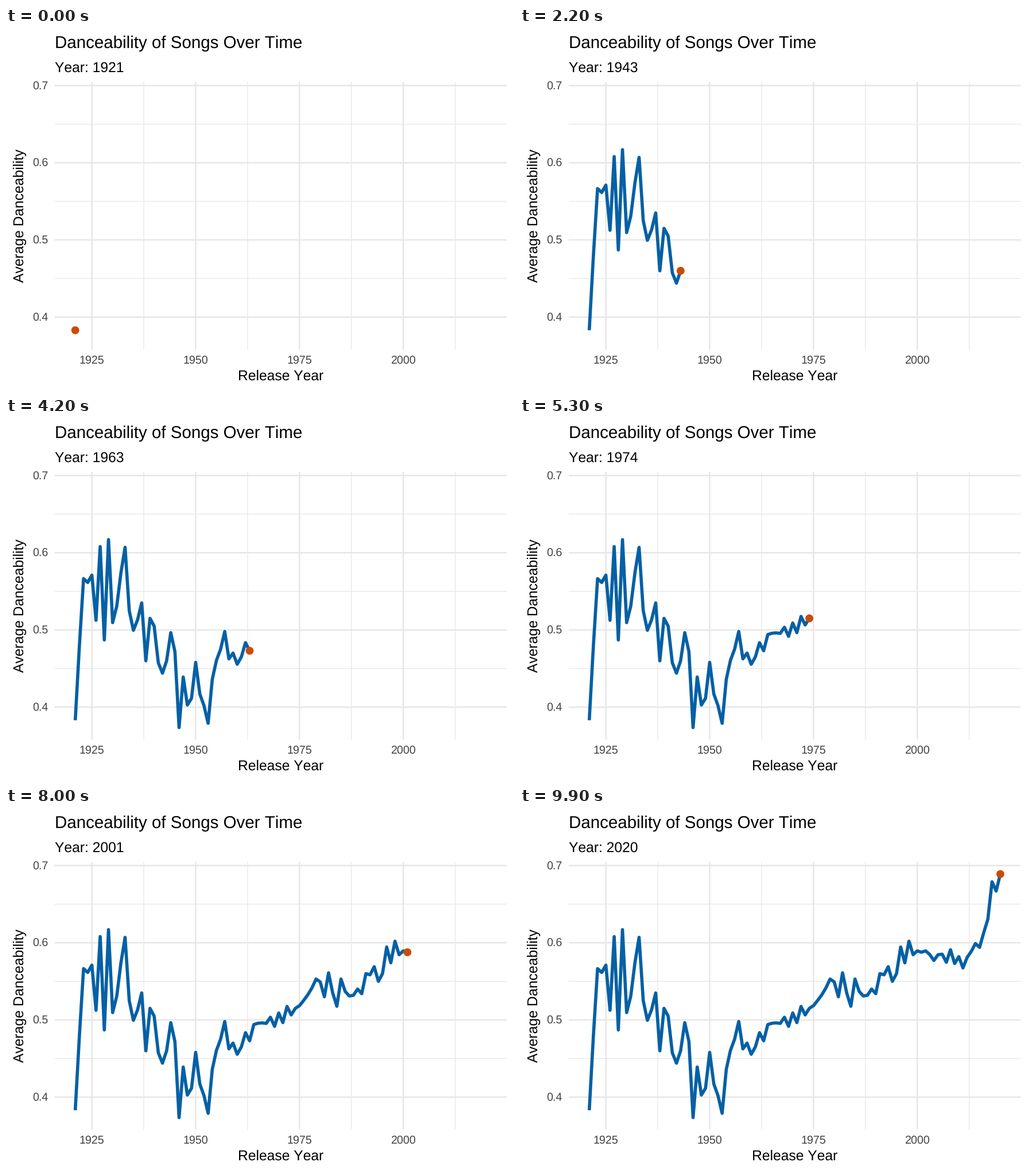
Recreate the animation shown at these times as a matplotlib script. Size 885 by 632 pixels, loop 10 s.

```python
import numpy as np
import matplotlib.pyplot as plt
from matplotlib.animation import FuncAnimation
from matplotlib.patches import Circle

W, H, DPI = 885, 632, 64
PT = 72 / DPI  # points per pixel
BASE = 24.6    # body text size in pixels
SMALL, LARGE = 0.8 * BASE, 1.2 * BASE
LEFT, RIGHT, TOP, BOTTOM = 84.8, 872.5, 94, 561.7
BLUE, ORANGE, GRID, TICK = "#0560a5", "#cc4b03", "#e6e6e6", "#424242"

plt.rcParams.update({
    "font.family": "Liberation Sans",
    "text.hinting": "none",
    "text.kerning_factor": 6,
    "path.snap": False,
})

# Average danceability per year, in thousandths, from 1921 on
SCORES = np.array([
    383, 480, 566.5, 561.5, 571, 512.5, 608, 487, 617, 509.5,
    531, 574, 607, 525, 499.5, 513, 535, 460, 515, 505,
    457.5, 444, 460, 496.5, 472, 373.5, 439, 402.7, 411.5, 458,
    417, 402, 379, 436, 460.5, 475, 498, 462.5, 470, 455.5,
    465, 483.5, 473, 494, 495.7, 496.2, 495.5, 503.5, 491.7, 509,
    496.5, 517.5, 506.5, 515, 518.5, 525.2, 532.5, 541.5, 553, 549.2,
    530, 561, 535, 517.7, 553, 537, 531, 532, 540, 534,
    560, 558.5, 569, 550, 560, 594.5, 574, 602, 584.5, 589.5,
    587.7, 589.5, 584.8, 577, 584.5, 585.2, 574.7, 591, 573, 582,
    567.3, 581, 588.7, 599, 594, 613, 630.5, 679, 667, 689,
]) / 1000
YEARS = 1921 + np.arange(len(SCORES))


def px(year):
    return 149.6 + (year - 1925) * 7.2335


def py(score):
    return 100.5 + (0.7 - score) * 1347.5


fig = plt.figure(figsize=(W / DPI, H / DPI), dpi=DPI, facecolor="white")
ax = fig.add_axes([0, 0, 1, 1])
ax.set(xlim=(0, W), ylim=(H, 0))
ax.axis("off")


def label(x, y, text, size=BASE, color="black", rotation=0):
    return ax.text(x, y, text, fontsize=size * PT, color=color, ha="left",
                   va="baseline", rotation=rotation, rotation_mode="anchor")


def grid(years, scores, width):
    style = dict(color=GRID, lw=width * PT, solid_capstyle="butt", zorder=1)
    for year in years:
        ax.plot([px(year)] * 2, [TOP, BOTTOM], **style)
    for score in scores:
        ax.plot([LEFT, RIGHT], [py(score)] * 2, **style)


major_years, major_scores = (1925, 1950, 1975, 2000), (0.4, 0.5, 0.6, 0.7)
grid((1937.5, 1962.5, 1987.5, 2012.5), (0.45, 0.55, 0.65), 1.2)
grid(major_years, major_scores, 2.4)

for year in major_years:
    label(px(year) - 1.112 * SMALL, 587, str(year), SMALL, TICK)
for score in major_scores:
    label(46.3, py(score) + 7, f"{score:.1f}", SMALL, TICK)

label(LEFT, 35, "Danceability of Songs Over Time", LARGE)
subtitle = label(LEFT, 77, "")
label(404.1, 615, "Release Year")
label(31, 444, "Average Danceability", rotation=90)

line, = ax.plot([], [], color=BLUE, lw=5.6 * PT, solid_capstyle="butt",
                solid_joinstyle="round", zorder=3)
dot = ax.add_patch(Circle((0, 0), 6.9, fc=ORANGE, lw=0, zorder=4))


def update(i):
    x, y = px(YEARS[:i + 1]), py(SCORES[:i + 1])
    line.set_data(x, y)
    line.set_visible(i > 0)
    dot.center = x[-1], y[-1]
    subtitle.set_text(f"Year: {YEARS[i]}")
    return line, dot, subtitle


anim = FuncAnimation(fig, update, frames=len(YEARS), interval=100,
                     repeat=True, repeat_delay=0)
plt.show()
```
